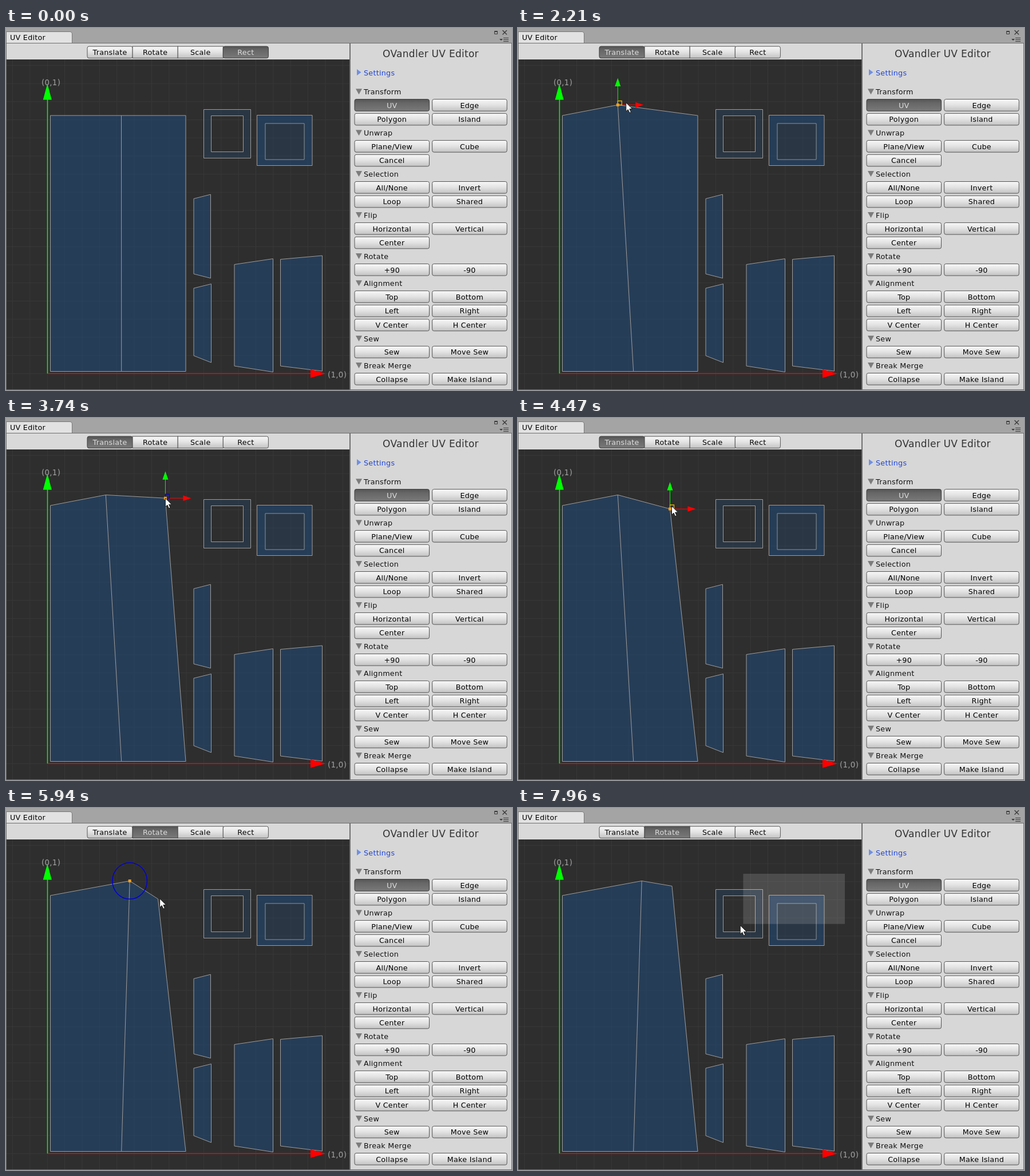
Animation, 884 px wide and 633 px high, one loop 8 s. Source, as an HTML page:

```html
<!DOCTYPE html>
<html lang="en">
<head>
<meta charset="utf-8">
<title>UV Editor</title>
<style>
html, body { margin: 0; width: 100%; height: 100%; overflow: hidden; background: #a4a4a4; }
svg { display: block; width: 884px; height: 633px; font: 12.7px "DejaVu Sans", sans-serif; letter-spacing: .28px; }
.line { fill: none; stroke: #a09c98; }
.face { fill: #1e4c80; fill-opacity: .5; stroke: #a09c98; }
.faint { fill: #1e4c80; fill-opacity: .25; stroke: #a09c98; }
.button rect { fill: url(#raised); stroke: #555; }
.button text { fill: #000; text-anchor: middle; }
.button.on rect { fill: url(#pressed); stroke: #3c3c3c; }
.button.on text { fill: #dedede; }
</style>
</head>
<body>
<svg viewBox="0 0 884 633">
  <defs>
    <linearGradient id="raised" x2="0" y2="1">
      <stop stop-color="#f8f8f8"/><stop offset=".5" stop-color="#e2e2e2"/><stop offset="1" stop-color="#c2c2c2"/>
    </linearGradient>
    <linearGradient id="pressed" x2="0" y2="1">
      <stop stop-color="#555"/><stop offset=".3" stop-color="#666"/><stop offset="1" stop-color="#797979"/>
    </linearGradient>
    <clipPath id="view"><path d="M1 55H600V632H1Z"/></clipPath>
  </defs>

  <path fill="#a4a4a4" d="M0 0H884V633H0Z"/>
  <path fill="#e2e2e2" stroke="#777" d="M.5 27V6.5H112Q115.5 6.5 115.5 10V27"/>
  <text x="7" y="21" fill="#000">UV Editor</text>
  <g fill="none" stroke="#3a3a3a">
    <path d="M853.5 5.5H858.5V10.5H853.5ZM853 6.5H859"/>
    <path stroke-width="1.4" d="M867.5 4L875 11.5M875 4L867.5 11.5"/>
    <path d="M869 17.5H878M869 20.5H878M869 23.5H878"/>
    <path fill="#3a3a3a" stroke="none" d="M862 19H868L865 22Z"/>
  </g>
  <path fill="#d9d9d9" d="M0 27H600V55H0Z"/>
  <path fill="#2e2e2e" d="M0 55H600V632H0Z"/>
  <path fill="#d7d7d7" d="M602 27H883V632H602Z"/>
  <path fill="none" stroke="#6e6e6e" d="M0 26.5H884M.5 27V632.5H883.5V27"/>
  <path stroke="#707070" stroke-width="2" d="M601 27V633"/>

  <g clip-path="url(#view)">
    <path id="grid" stroke="#383838" fill="none"/>
    <path id="body" class="face"/>
    <path id="seam" class="line"/>
    <path class="faint" fill-rule="evenodd" d="M345.5 142.5H427.5V227.5H345.5ZM358.5 153.5V216.5H414.5V153.5Z"/>
    <path class="face" fill-rule="evenodd" d="M438.5 152.5H535V240.5H438.5ZM453 167V230H521V167Z"/>
    <path class="faint" stroke-opacity="0" d="M453 167H521V230H453Z"/>
    <path class="face" d="M328 298.5L357.5 291V437.5L328 430Z"/>
    <path class="face" d="M328 455L358.5 447.5V585L328 573Z"/>
    <path class="face" d="M399 413.5L466.5 403.5V601.5L399 591Z"/>
    <path class="face" d="M479.5 404.5L552.5 398V600L479.5 591Z"/>
    <g fill="#a2a2a2" font-size="13.4">
      <text x="62" y="99.5">(0,1)</text>
      <text x="562" y="610.5">(1,0)</text>
    </g>
    <path stroke="#f00" stroke-width="1.5" d="M72 604.3H535"/>
    <path fill="#f00" d="M558.5 604.3L532 596.8V611.8Z"/>
    <path stroke="#0f0" stroke-width="1.5" d="M72.5 604V122"/>
    <path fill="#0f0" d="M72.3 97.5L64.8 125.5H79.8Z"/>

    <g id="mover">
      <path stroke="#0f0" d="M0 0V-34"/>
      <path fill="#0f0" d="M0 -47L-5 -32.5H5Z"/>
      <path stroke="#f00" d="M0 0H32"/>
      <path fill="#f00" d="M45 0L31 -4.7V4.7Z"/>
      <path id="handle" fill="none" stroke-width="1.3" d="M0 0V-7H7V0Z"/>
    </g>
    <ellipse id="ring" rx="30.3" ry="31.7" fill="none" stroke="#0000d4" stroke-width="1.5"/>
    <path id="dot" fill="#f0a020" d="M-2.5 -2.5H2.5V2.5H-2.5Z"/>
    <path id="marquee" fill="#fff" fill-opacity=".14"/>
  </g>

  <g id="toolbar"></g>
  <g id="panel">
    <text x="742" y="51" font-size="17" text-anchor="middle" fill="#333">OVandler UV Editor</text>
    <path fill="#6f8fe6" d="M613 72L620.5 77.5L613 83Z"/>
    <text x="625" y="82.7" fill="#2146d8">Settings</text>
  </g>
  <path id="cursor" fill="#fff" stroke="#111" stroke-width=".9" d="M0 0V15.2L3.5 12L6.1 17.8L8.6 16.7L6.1 11H11Z"/>
</svg>

<script>
const $ = id => document.getElementById(id);
const LOOP = 8000, ROW = 24.75;

function add(parent, name, attrs, text = "") {
  const node = document.createElementNS("http://www.w3.org/2000/svg", name);
  for (const key in attrs) node.setAttribute(key, attrs[key]);
  node.textContent = text;
  parent.append(node);
  return node;
}

function button(parent, label, x, y, width, radius, on) {
  const group = add(parent, "g", { class: on ? "button on" : "button" });
  add(group, "rect", { x, y: y - 10.3, width, height: 20.6, rx: radius });
  add(group, "text", { x: x + width / 2, y: y + 4.8 }, label);
  return group;
}

const modes = ["Translate", "Rotate", "Scale", "Rect"];
const tabs = modes.map((label, i) => button($("toolbar"), label, 142 + i * 79.1, 42.4, 79.1, i % 3 ? 0 : 3));

const sections = {
  "Transform": ["UV", "Edge", "Polygon", "Island"],
  "Unwrap": ["Plane/View", "Cube", "Cancel"],
  "Selection": ["All/None", "Invert", "Loop", "Shared"],
  "Flip": ["Horizontal", "Vertical", "Center"],
  "Rotate": ["+90", "-90"],
  "Alignment": ["Top", "Bottom", "Left", "Right", "V Center", "H Center"],
  "Sew": ["Sew", "Move Sew"],
  "Break Merge": ["Collapse", "Make Island"]
};
let y = 111.2;
for (const title in sections) {
  const labels = sections[title];
  add($("panel"), "path", { fill: "#7c7c7c", d: `M611 ${y - 5}h11l-5.5 10z` });
  add($("panel"), "text", { x: 625, y: y + 4.7, fill: "#111" }, title);
  labels.forEach((label, i) =>
    button($("panel"), label, i % 2 ? 744.7 : 609, y + 23.7 + (i >> 1) * ROW, 130.5, 3, label === "UV"));
  y += 22.45 + Math.ceil(labels.length / 2) * ROW;
}

let grid = "";
for (let i = -2; i < 18; i++) {
  grid += `M${72.3 + i * 30.35} 55V632M0 ${604.3 - i * 31.7}H600`;
}
$("grid").setAttribute("d", grid);

const onTab = mode => [180 + modes.indexOf(mode) * 79, 40];
const start = { pointer: [762, 632], peak: [201.5, 153], corner: [314, 153], mode: "Rect", pick: "", hold: "" };
const peakLow = [174.3, 134.5], cornerLow = [265.5, 159], marqueeStart = [571, 115];

// The pointer's moves: when, where to, the bend of the path, what is held and what the click at the end sets.
const moves = [
  { from: 180, until: 500, to: onTab("Translate"), then: { mode: "Translate" } },
  { from: 620, until: 920, to: start.peak, then: { pick: "peak" } },
  { from: 1000, until: 2080, to: peakLow, via: [213.7, 68], hold: "peak" },
  { from: 2100, until: 2640, to: start.corner, via: [240, 113], then: { pick: "corner" } },
  { from: 2680, until: 3360, to: [275.5, 124.5], via: [365, 138], hold: "corner" },
  { from: 3460, until: 4100, to: cornerLow, via: [285, 145], hold: "corner" },
  { from: 4240, until: 4320, to: [268.5, 154] },
  { from: 4470, until: 4760, to: onTab("Rotate"), then: { mode: "Rotate" } },
  { from: 4880, until: 5140, to: peakLow, then: { pick: "peak" } },
  { from: 5280, until: 5780, to: [216.2, 127.5], via: [200, 92], hold: "peak" },
  { from: 5800, until: 5940, to: [268.7, 158.5] },
  { from: 6080, until: 6140, to: cornerLow, then: { pick: "corner" } },
  { from: 6140, until: 6760, to: [275, 128], via: [320, 142], hold: "corner" },
  { from: 6760, until: 7160, to: [269, 136.5], via: [237, 137], hold: "corner" },
  { from: 7160, until: 7420, to: [783, 150] },
  { from: 7420, until: 7700, to: marqueeStart, then: { pick: "" } },
  { from: 7720, until: 7960, to: [388.3, 205.3], hold: "marquee" }
];

const mix = (a, b, s) => a.map((v, i) => v + (b[i] - v) * s);
const smooth = u => u * u * (3 - 2 * u);

function sceneAt(t) {
  const scene = { ...start };
  for (const { from, until, to, via, hold = "", then } of moves) {
    if (t < from) break;
    const s = smooth(Math.min(1, (t - from) / (until - from)));
    const a = scene.pointer;
    scene.pointer = via ? mix(mix(a, via, s), mix(via, to, s), s) : mix(a, to, s);
    if (hold) scene[hold] = scene.pointer;
    scene.hold = t < until ? hold : "";
    if (t >= until) Object.assign(scene, then);
  }
  return scene;
}

function place(id, visible, [x, y]) {
  $(id).setAttribute("transform", `translate(${x} ${y})`);
  $(id).setAttribute("visibility", visible ? "visible" : "hidden");
}

function draw(t) {
  const { pointer, peak, corner, mode, pick, hold } = sceneAt(t);
  const spot = pick === "corner" ? corner : peak;

  $("body").setAttribute("d", `M77.5 153L${peak}L${corner}L314 600.5H77.5Z`);
  $("seam").setAttribute("d", `M${peak}L201.7 600.5`);
  tabs.forEach((tab, i) => tab.classList.toggle("on", modes[i] === mode));

  place("mover", pick && mode === "Translate", spot);
  place("ring", pick && mode === "Rotate", spot);
  place("dot", pick, spot);
  $("handle").setAttribute("stroke", hold ? "#0000e0" : "#e8b010");

  // The marquee trails slightly behind the pointer.
  const { marquee } = sceneAt(t - 25);
  $("marquee").setAttribute("d", marquee ? `M${marqueeStart}H${marquee[0]}V${marquee[1]}H${marqueeStart[0]}Z` : "");
  place("cursor", t >= moves[0].from, pointer);
}

function tick() {
  draw(performance.now() % LOOP);
  requestAnimationFrame(tick);
}
tick();
</script>
</body>
</html>
```
